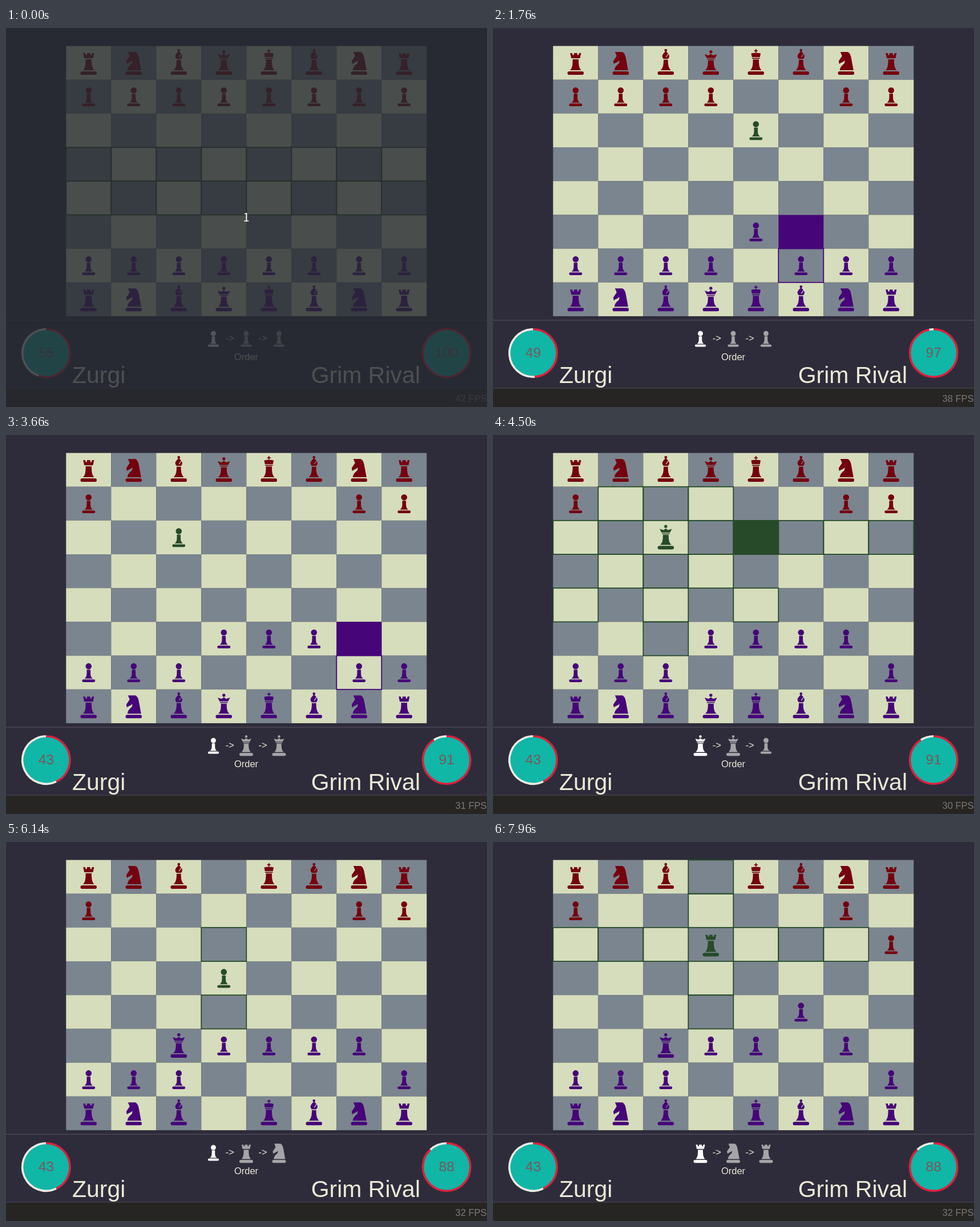
An HTML page with a canvas that plays this animation: 843x664 px, repeating every 8000 ms.

```html
<!DOCTYPE html>
<html lang="en">
<head>
<meta charset="utf-8">
<title>Chess battle</title>
<style>
  html, body { margin: 0; width: 100%; height: 100%; overflow: hidden; background: #2e2c3b; }
  canvas { display: block; }
</style>
</head>
<body>
<canvas id="stage" width="843" height="664"></canvas>
<script>
const ctx = document.getElementById('stage').getContext('2d');
const LOOP = 8000;
const BOARD = { x: 105.3, y: 31.5, w: 79, h: 59.18 };
const SANS = '"Liberation Sans", Arial, sans-serif';
const COLOR = {
  back: '#2e2c3b', light: '#d6ddbc', dark: '#7b858f', text: '#ece8d6',
  red: '#75000f', purple: '#460578', hero: '#274b29'
};

// Automatic moves: select, aim, land, from, to
const MOVES = [
  [420, 500, 580, 'e7', 'e6'],
  [780, 860, 940, 'e2', 'e3'],
  [1220, 1300, 1460, 'f7', 'e6'],
  [1620, 1700, 1780, 'f2', 'f3'],
  [2160, 2240, 2320, 'c7', 'c6'],
  [2460, 2620, 2700, 'd2', 'd3'],
  [3120, 3200, 3300, 'b7', 'c6'],
  [3580, 3660, 3760, 'g2', 'g3'],
  [4700, 4780, 4860, 'd8', 'd5'],
  [5120, 5200, 5260, 'd1', 'd2'],
  [5900, 5980, 6060, 'd2', 'c3'],
  [7020, 7100, 7180, 'h7', 'h6'],
  [7380, 7460, 7520, 'f3', 'f4']
];
// Player turns: start, end, destination
const TURNS = [
  [0, 220, 'd5'], [940, 1080, 'e6'], [1780, 2000, 'd7'], [2700, 2960, 'c6'],
  [3760, 4580, 'e6'], [5360, 5520, 'd5'], [6140, 6840, 'd6'], [7560, 9000, 'd6']
];
const HOVERS = [
  [100, 220, 'd5'], [3920, 4100, 'd7'], [4140, 4500, 'd6'],
  [4500, 4580, 'e6'], [6560, 6700, 'd4'], [6760, 6840, 'd6']
];
const QUEUE = 'PPPPQQPRNR';
const FPS = [[0, 42], [1380, 38], [1900, 35], [2460, 33], [3300, 32], [3580, 31],
             [4500, 30], [5520, 31], [5980, 32], [7100, 33], [7960, 32]];

const cellName = (col, row) => 'abcdefgh'[col] + (8 - row);
const cellPos = name => [name.charCodeAt(0) - 97, 8 - name[1]];
const inBoard = (col, row) => col >= 0 && col < 8 && row >= 0 && row < 8;

const EVENTS = [
  ...MOVES.map(([, , time, from, to]) => ({ time, from, to })),
  ...TURNS.map(([, time, to]) => ({ time, to }))
].sort((a, b) => a.time - b.time);

function stateAt(t) {
  const board = {};
  for (let col = 0; col < 8; col++) {
    board[cellName(col, 0)] = { type: 'RNBQKBNR'[col], side: 'red' };
    board[cellName(col, 1)] = { type: 'P', side: 'red' };
    board[cellName(col, 6)] = { type: 'P', side: 'purple' };
    board[cellName(col, 7)] = { type: 'RNBQKBNR'[col], side: 'purple' };
  }
  const state = { board, hero: null, left: 55, right: 100 };
  for (const { time, from, to } of EVENTS) {
    if (time > t) break;
    if (!from) {
      if (board[to]) state.right -= 3;
      delete board[to];
      state.hero = to;
    } else {
      // An attacker is spent when it strikes the player.
      if (to === state.hero) state.left -= 6;
      else board[to] = board[from];
      delete board[from];
    }
  }
  state.turn = TURNS.filter(([start]) => start <= t).length - 1;
  state.choosing = t < TURNS[state.turn][1];
  return state;
}

function openCells({ board, hero, turn }) {
  const cells = [];
  if (!hero) {
    for (let i = 0; i < 16; i++) cells.push(cellName(i % 8, 3 + (i >> 3)));
    return cells;
  }
  const type = QUEUE[turn], [col, row] = cellPos(hero);
  const straight = [[0, -1], [0, 1], [-1, 0], [1, 0]];
  const diagonal = [[-1, -1], [1, -1], [-1, 1], [1, 1]];
  const rays = type === 'P' ? straight.slice(0, 2)
    : type === 'Q' ? [...straight, ...diagonal] : straight;
  for (const [dx, dy] of rays) {
    for (let n = 1; n <= (type === 'P' ? 1 : 7); n++) {
      const c = col + dx * n, r = row + dy * n;
      if (!inBoard(c, r) || board[cellName(c, r)]) break;
      cells.push(cellName(c, r));
    }
  }
  return cells;
}

// Piece outlines around the centre of a cell
const BASE = 'M-12-0';
const bar = (half, top, bottom) => {
  const r = (bottom - top) / 2;
  return `M${-half + r} ${top}H${half - r}A${r} ${r} 0 0 1 ${half - r} ${bottom}H${-half + r}A${r} ${r} 0 0 1 ${-half + r} ${top}Z`;
};
const disc = (y, r) => `M${-r} ${y}A${r} ${r} 0 1 1 ${r} ${y}A${r} ${r} 0 1 1 ${-r} ${y}Z`;
const skirt = (neck, top, foot, bottom) =>
  `M${-neck} ${top}H${neck}C${neck} ${top + 10} ${foot - 4} ${bottom - 4} ${foot} ${bottom}H${-foot}C${4 - foot} ${bottom - 4} ${-neck} ${top + 10} ${-neck} ${top}Z`;
const FOOT = bar(14.3, 14.8, 21);
const SHAPES = {
  P: disc(-11, 5.3) + skirt(3.3, -5, 7, 10.5) + bar(11.5, 12, 16.8),
  R: 'M-9.6-17H-6L-5-13.6H-3.2L-2.7-17H2.7L3.2-13.6H5L6-17H9.6L7.6-8H-7.6Z' + skirt(5.2, -6.3, 9.8, 13) + FOOT,
  N: 'M-10-19H3Q8-17 9.5-6L13 13H-11Q-11 7-3 1L-2-4Q-6-1-9 0L-12 2L-13-3L-7-12Z' + FOOT,
  B: disc(-22, 2.4) + 'M0-20.5C4-17 6.3-14 6.2-11.5Q6-9 4-7H-4Q-6-9-6.2-11.5C-6.3-14-4-17 0-20.5Z' + skirt(3.8, -5.5, 9, 13) + FOOT,
  Q: disc(-19.3, 2.7) + 'M-10.8-15L-4-13L0-15.8L4-13L10.8-15L7.4-8.5H-7.4Z' + 'M-7-7.3H7L6.5-5.8H-6.5Z' + skirt(5, -4.6, 9.8, 13) + FOOT,
  K: 'M-.9-24H.9V-22.2H3V-20.4H.9V-18H-.9V-20.4H-3V-22.2H-.9Z' + 'M-8.3-16.5Q0-18.5 8.3-16.5L7-10H-7Z' + 'M-7-8.8H7L6.5-7.2H-6.5Z' + skirt(5.2, -6, 9.8, 13) + FOOT
};
const PATHS = Object.fromEntries(Object.entries(SHAPES).map(([type, d]) => [type, new Path2D(d)]));
const NOTCH = new Path2D('M.5-10L4.5-16');

function drawPiece(type, x, y, color, back, scale = 1) {
  ctx.save();
  ctx.translate(x, y);
  ctx.scale(scale, scale);
  ctx.fillStyle = color;
  ctx.fill(PATHS[type]);
  if (type === 'B') {
    ctx.strokeStyle = back;
    ctx.lineWidth = 1.1;
    ctx.stroke(NOTCH);
  }
  ctx.restore();
}

function rect(x, y, w, h, color) {
  ctx.fillStyle = color;
  ctx.fillRect(x, y, w, h);
}

function text(value, x, y, size, color, align = 'center', family = SANS) {
  ctx.font = `${size}px ${family}`;
  ctx.textAlign = align;
  ctx.fillStyle = color;
  ctx.fillText(value, x, y);
}

function cellBox(name) {
  const [col, row] = cellPos(name);
  return [BOARD.x + col * BOARD.w, BOARD.y + row * BOARD.h, BOARD.w, BOARD.h];
}

function cellColor(name) {
  const [col, row] = cellPos(name);
  return (col + row) % 2 ? COLOR.dark : COLOR.light;
}

function fillCell(name, color) { rect(...cellBox(name), color); }

function outlineCell(name, color) {
  ctx.strokeStyle = color;
  ctx.lineWidth = 1.8;
  ctx.strokeRect(...cellBox(name));
}

function pieceOnCell(type, name, color) {
  const [x, y, w, h] = cellBox(name);
  drawPiece(type, x + w / 2, y + h / 2, color, cellColor(name));
}

function drawBoard(t, state) {
  const { board, hero, turn, choosing } = state;
  for (let i = 0; i < 64; i++) {
    const name = cellName(i % 8, i >> 3);
    fillCell(name, cellColor(name));
  }
  const active = MOVES.find(([pick, , land]) => t >= pick && t < land);
  const side = active && board[active[3]].side;
  if (active && t >= active[1]) fillCell(active[4], COLOR[side]);
  const hover = HOVERS.find(([start, end]) => t >= start && t < end);
  if (hover) fillCell(hover[2], COLOR.hero);

  for (const name in board) pieceOnCell(board[name].type, name, COLOR[board[name].side]);
  if (hero) pieceOnCell(QUEUE[turn], hero, COLOR.hero);

  if (active) outlineCell(active[3], COLOR[side]);
  if (choosing) openCells(state).forEach(name => outlineCell(name, COLOR.hero));
}

function drawHealth(x, value) {
  const y = 569.5, top = -Math.PI / 2, end = top + value / 100 * Math.PI * 2;
  const arc = (from, to, color) => {
    ctx.beginPath();
    ctx.arc(x, y, 41.7, from, to);
    ctx.strokeStyle = color;
    ctx.lineWidth = 3.6;
    ctx.stroke();
  };
  ctx.beginPath();
  ctx.arc(x, y, 41, 0, Math.PI * 2);
  ctx.fillStyle = '#10b6a6';
  ctx.fill();
  if (value < 100) arc(end, top + Math.PI * 2, '#ebebe4');
  arc(top, end, '#e01f3d');
  text(value, x, 577, 24.5, '#7b575c');
}

function drawPanel(t, { left, right, turn }) {
  rect(0, 511, 843, 2, '#43424d');
  rect(0, 631, 843, 33, '#272523');
  rect(0, 630.5, 843, 1.2, '#43424a');
  drawHealth(70.4, left);
  drawHealth(772.2, right);
  for (let i = 0; i < 3; i++) {
    drawPiece(QUEUE[turn + i], 363.5 + i * 57.5, 544.5, i ? '#a5a5a7' : '#fff', COLOR.back, 0.84);
  }
  text('->', 392.3, 549, 16.5, COLOR.text);
  text('->', 450, 549, 16.5, COLOR.text);
  text('Order', 421, 582, 16.5, COLOR.text);
  text('Zurgi', 116, 622, 41, COLOR.text, 'left');
  text('Grim Rival', 726, 622, 41, COLOR.text, 'right');
  const fps = FPS.filter(([time]) => time <= t).pop()[1];
  text(fps + ' FPS', 842.5, 655, 16.5, '#7b7976', 'right');
}

function draw(t) {
  const state = stateAt(t);
  rect(0, 0, 843, 664, COLOR.back);
  drawBoard(t, state);
  drawPanel(t, state);
  if (t < 20) {
    rect(0, 0, 843, 664, 'rgba(38,42,48,.8)');
    text('1', 421, 339, 20, '#fff', 'center', '"Noto Sans CJK JP", "Noto Sans CJK SC", "DejaVu Sans", sans-serif');
  }
}

const origin = performance.now();
function frame() {
  draw((performance.now() - origin) % LOOP);
  requestAnimationFrame(frame);
}
draw(0);
requestAnimationFrame(frame);
</script>
</body>
</html>
```
